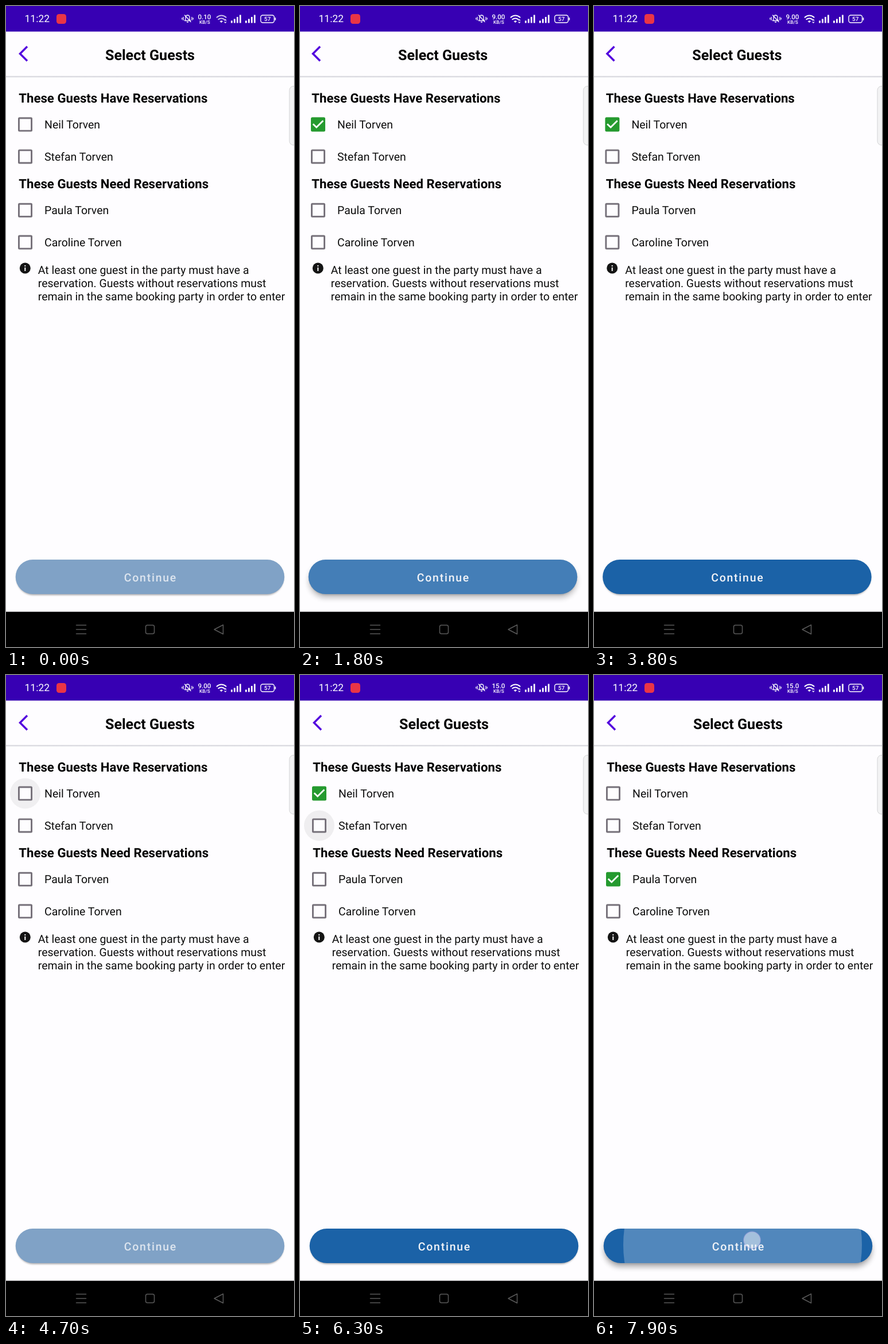
These frames come from a looping animation (502 by 1115 pixels, 8 s). An HTML page:

```html
<!DOCTYPE html>
<html lang="en">
<head>
<meta charset="utf-8">
<title>Select Guests</title>
<style>
  html, body { margin: 0; width: 100%; height: 100%; overflow: hidden; background: #fefdff; }
  svg { display: block; width: 502px; height: 1115px; font-family: Roboto, sans-serif; text-rendering: geometricPrecision; }
  .title { font-size: 25.1px; font-weight: 700; text-anchor: middle; }
  .head { font-size: 22.2px; font-weight: 700; }
  .body { font-size: 19.48px; fill: #0c0c0c; }
  .label { font-size: 19.52px; font-weight: 500; letter-spacing: 1.74px; text-anchor: middle; fill: #f2f4f8; }
  .small { font-weight: 500; text-anchor: middle; fill: #fff; }
  .line { fill: none; stroke-linecap: round; stroke-linejoin: round; }
</style>
</head>
<body>
<svg viewBox="0 0 502 1115">
  <defs>
    <clipPath id="pill"><rect x="16.700" y="963" width="468.600" height="60" rx="30"/></clipPath>
    <filter id="blur" x="-10%" y="-40%" width="120%" height="180%"><feGaussianBlur stdDeviation="1.600"/></filter>
    <filter id="wide" x="-10%" y="-40%" width="120%" height="180%"><feGaussianBlur stdDeviation="5"/></filter>
    <linearGradient id="edge" x2="0" y2="1">
      <stop stop-color="#ececf0"/><stop offset=".45" stop-color="#d2d2d8"/><stop offset="1" stop-color="#f2f2f5"/>
    </linearGradient>
  </defs>
  <rect width="502" height="1115" fill="#fefdff"/>
  <g id="list"></g>
  <g id="confirm"></g>

  <rect x="494" y="139.500" width="20" height="102.500" rx="7" fill="#f3f3f4" stroke="#d3d3d5"/>

  <rect width="502" height="44.500" fill="#3700b3"/>
  <text x="32.500" y="28.300" font-size="17.5" fill="#fff">11:22</text>
  <rect x="88" y="14" width="17" height="17" rx="4.500" fill="#ea3546"/>
  <g class="line" stroke="#fff" stroke-width="1.300">
    <path d="M311.500 25.500h10l-1.500-2.500v-3.500a3.500 3.500 0 0 0-7 0v3.500zM315.500 28h2M311.500 16l10.500 11.500M309 19.500v5M306.800 21v2M324 19.500v5M326.200 21v2"/>
  </g>
  <text id="rate" class="small" x="346" y="22.800" font-size="11.500"></text>
  <text class="small" x="346.500" y="30.800" font-size="8.300">KB/S</text>
  <g class="line" stroke="#fff" stroke-width="2">
    <path id="arcs" d="M367.500 19.800a11.500 11.500 0 0 1 16 0M370.300 23.300a7.500 7.500 0 0 1 10 0"/>
    <path d="M373.500 26.500a3.500 3.500 0 0 1 4 0l-2 2z" fill="#fff" stroke-width="1"/>
    <path d="M381 25l1.300-1.500 1.300 1.500M381 27.800l1.300 1.500 1.300-1.500" stroke-width="1.200"/>
  </g>
  <path id="bars" fill="#fff"/>
  <rect x="444" y="16" width="23.500" height="13" rx="3.500" fill="none" stroke="#fff" stroke-width="1.400"/>
  <rect x="468.500" y="20" width="1.800" height="5" rx=".9" fill="#fff"/>
  <text class="small" x="455.700" y="26.300" font-size="10">57</text>

  <rect y="1053.700" width="502" height="62"/>
  <g class="line" stroke="#585858" stroke-width="1.500">
    <path d="M122.500 1077h17M122.500 1084.500h17M122.500 1092h17M363 1084.500l15.500-8v16z"/>
    <rect x="243.500" y="1077" width="15" height="15" rx="3"/>
  </g>
  <circle id="touch" fill="#fff" fill-opacity=".48" stroke="#b4aae6" stroke-opacity=".4" stroke-width="1.800"/>
</svg>
<script>
const LOOP = 8000, STEP = 100, W = 502;
const GREEN = '#259a2f', GREY = '#757079';
const guests = [['Neil Torven', 206.1], ['Stefan Torven', 261.9], ['Paula Torven', 355.3], ['Caroline Torven', 411.1]];
// [guest, time of toggle]
const taps = [[0, 750], [0, 4380], [1, 4900], [0, 5440], [1, 5990], [0, 6420], [2, 6850]];
// button presses: [touch time, release time]
const presses = [[1590, 1740], [7780, 8200]];
const $ = id => document.getElementById(id);
const clamp = v => Math.max(0, Math.min(1, v));
const ramp = (t, from, to) => clamp((t - from) / (to - from));
const swing = p => (1 - Math.cos(Math.PI * p)) / 2;

const text = (cls, x, y, str) => `<text class="${cls}" x="${x}" y="${y}">${str}</text>`;

const header = title => `
  <rect y="121.500" width="${W}" height="3" fill="url(#edge)"/>
  <path d="M37 70.500L24.500 83L37 95.500" fill="none" stroke="#5200de" stroke-width="3.500"/>
  ${text('title', 251, 93.5, title)}`;

const button = (id, label) => `
  <rect id="${id}Lift" x="17" y="970" width="468" height="60" rx="30" opacity="0" filter="url(#wide)"/>
  <rect id="${id}Shade" x="18" y="965" width="466" height="60" rx="30" opacity=".3" filter="url(#blur)"/>
  <rect id="${id}Fill" x="16.700" y="963" width="468.600" height="60" rx="30" fill="#1b62a7"/>
  <g clip-path="url(#pill)"><circle id="${id}Wave" cy="991" fill="#fff" opacity="0"/></g>
  <g id="${id}Text">${text('label', 251.9, 1001, label)}</g>`;

const guestRow = ([name, y], i) => `
  <g transform="translate(33.500 ${y})">
    <circle id="wave${i}"/>
    <rect id="box${i}" x="-12.500" y="-12.500" width="25" height="25" rx="2.500"/>
    <rect id="hole${i}" fill="#fefdff"/>
    <path id="tick${i}" d="M-8.800 -.9L-2.800 5L8.800 -6.500" pathLength="1" fill="none" stroke="#fff" stroke-width="2.800"/>
  </g>
  ${text('body', 67, y + 6.9, name)}`;

$('list').innerHTML = header('Select Guests') +
  text('head', 22.3, 167.5, 'These Guests Have Reservations') +
  text('head', 22.3, 316.5, 'These Guests Need Reservations') +
  guests.map(guestRow).join('') +
  `<circle cx="33.300" cy="456" r="9.500" fill="#141414"/>
   <path d="M33.300 451v2M33.300 454.800v6.200" stroke="#fff" stroke-width="2"/>` +
  ['At least one guest in the party must have a',
   'reservation. Guests without reservations must',
   'remain in the same booking party in order to enter']
    .map((s, i) => text('body', 55.8, 465.8 + i * 23, s)).join('') +
  button('next', 'Continue');

$('confirm').innerHTML = header('Confirmation') +
  `<text class="body" x="251" y="557" text-anchor="middle">Are you sure you want to confirm?</text>` +
  button('done', 'Done');

$('bars').setAttribute('d', [392, 417].map(x =>
  [4, 7, 10.5, 14].map((h, i) => `M${x + i * 5} 29.500v${-h}h2.800v${h}z`).join('')).join(''));

function set(id, attrs) {
  const el = $(id);
  for (const k in attrs) el.setAttribute(k, attrs[k]);
}

function drawGuest(i, t) {
  const past = taps.filter(([g, at]) => g === i && at <= t);
  const on = past.length % 2 === 1;
  const age = past.length ? t - past[past.length - 1][1] : 1e4;
  const p = ramp(age, 0, 150);
  const rim = on ? 2.9 + 9.6 * p * p : 12.5 - 9.6 * p;
  const h = Math.max(0, 12.5 - rim);
  set('box' + i, { fill: on ? GREEN : GREY });
  set('hole' + i, { x: -h, y: -h, width: 2 * h, height: 2 * h });
  const drawn = on ? ramp(age, 180, 320) : 0;
  set('tick' + i, { 'stroke-dasharray': `${drawn} 2`, opacity: drawn ? 1 : 0 });
  set('wave' + i, {
    r: 26.5 * ramp(age, 40, 150),
    opacity: 0.11 * ramp(age, 50, 130) * (1 - ramp(age, 200, 440))
  });
  return on;
}

function drawPress(t) {
  const [down, up] = presses.find(([a, b]) => t >= a && t < b + 300) || [LOOP, LOOP];
  const age = Math.max(0, t - down), fade = 1 - ramp(t, up, up + 250);
  const lift = ramp(age, 0, 100) * fade;
  set('nextWave', {
    cx: 275 - 24 * ramp(age, 0, 180),
    r: 20 + 188 * age / 120,
    opacity: age ? 0.235 * fade : 0
  });
  set('nextLift', { opacity: 0.3 * lift });
  set('nextShade', { opacity: 0.3 - 0.2 * lift });
}

function touchAt(t) {
  for (const [g, at] of taps)
    if (t >= at - 80 && t < at + 90) return [35, guests[g][1] - 5.8, 15.3];
  for (const [down, up] of presses)
    if (t >= down && t < up) return [275.5, 983, 14.5];
  if (t >= 2600 && t < 2800) return [27, 65 + 11 * ramp(t, 2600, 2700), 15.3];
  if (t >= 3200 && t < 3310) return [27, 71, 15.3];
}

function draw(t) {
  const slide = swing(ramp(t, 1780, 2280)) - swing(ramp(t, 3318, 3818));
  set('list', { transform: `translate(${-W * slide})`, visibility: slide < 1 ? 'visible' : 'hidden' });
  set('confirm', { transform: `translate(${W * (1 - slide)})`, visibility: slide > 0 ? 'visible' : 'hidden' });

  const enabled = guests.map((g, i) => drawGuest(i, t)).some(Boolean);
  set('nextFill', { fill: enabled ? '#1b62a7' : '#80a2c6' });
  set('nextText', { opacity: enabled ? 1 : 0.82 });
  drawPress(t);

  const dot = touchAt(t);
  set('touch', dot ? { cx: dot[0], cy: dot[1], r: dot[2], opacity: 1 } : { opacity: 0 });
  $('rate').textContent = t < 1400 ? '0.10' : t < 5400 ? '9.00' : '15.0';
  set('arcs', { opacity: t < 400 ? 0.75 : 1 });
}

function tick() {
  const t = performance.now() % LOOP;
  draw(Math.floor(t / STEP) * STEP);
  requestAnimationFrame(tick);
}
tick();
</script>
</body>
</html>
```
